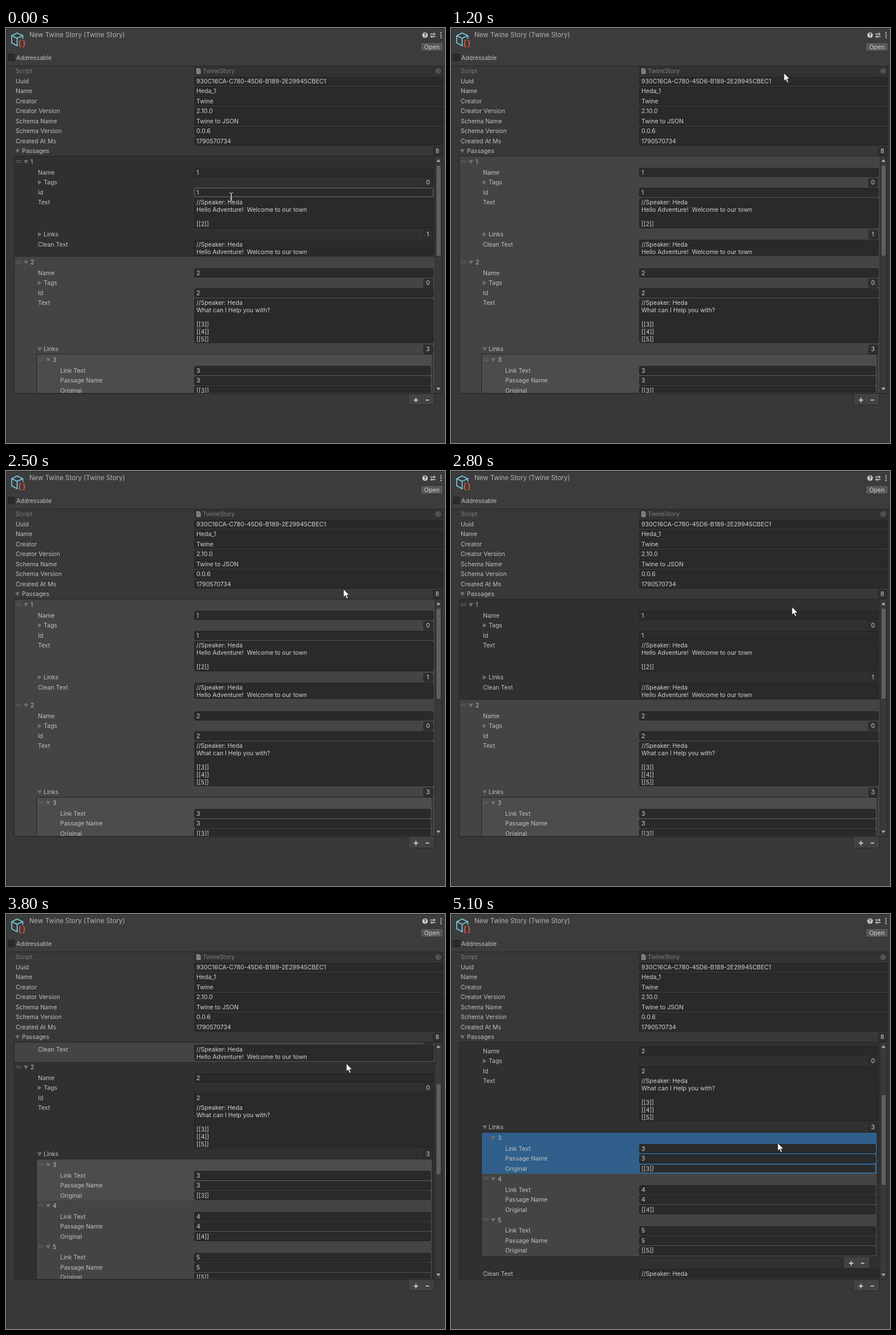
An HTML page that plays this animation: 770x727 px, repeating every 5200 ms.

```html
<!DOCTYPE html>
<html lang="en">
<head>
<meta charset="utf-8">
<title>Story inspector</title>
<style>
  html, body { margin: 0; width: 100%; height: 100%; overflow: hidden; background: #383838; }
  svg { display: block; }
  text { font: 10.52px Inter, "Liberation Sans", sans-serif; fill: #c0c0c0; white-space: pre; }
  .value { fill: #d0d0d0; }
  .dim { fill: #7d7d7d; }
  .title { font-size: 11.45px; fill: #b4b4b4; }
  .field { fill: #2a2a2a; stroke: #222; }
  .field.hover { stroke: #6c6c6c; }
  .field.focus { stroke: #3a78b4; }
  .count { fill: #2f2f2f; stroke: #252525; }
  .off { fill: #323232; stroke: #2a2a2a; }
  .mark { fill: #727272; }
  .grip { stroke: #666; fill: none; }
  .item { fill: #444; }
  .item.hover { fill: #303030; }
  .item.chosen { fill: #4c4c4c; }
  .item.active { fill: #2f5f8a; }
  .icon { fill: none; stroke: #c8c8c8; stroke-width: 1.3; }
  .sign { stroke: #dcdcdc; stroke-width: 1.6; }
</style>
</head>
<body>
<svg id="stage" width="770" height="727" viewBox="0 0 770 727">
  <defs><clipPath id="view"><rect x="15" y="225" width="737" height="414"/></clipPath></defs>
</svg>
<script>
const stage = document.getElementById('stage');
const LOOP = 5200, STEP = 100, LINE = 12.7;
const NPC = 'Heda';
const fields = [], items = [];

function add(parent, tag, attrs, content) {
  const el = document.createElementNS('http://www.w3.org/2000/svg', tag);
  for (const key in attrs) el.setAttribute(key, attrs[key]);
  if (content !== undefined) el.textContent = content;
  parent.appendChild(el);
  return el;
}

const path = (parent, d, cls, more) => add(parent, 'path', { d, class: cls, ...more });
const text = (parent, x, cy, str, cls = '', more) =>
  add(parent, 'text', { x, y: cy + 3.8, class: cls, ...more }, str);

function box(parent, x, y, right, bottom, attrs) {
  return add(parent, 'rect', {
    x: Math.round(x) + .5, y: Math.round(y) + .5,
    width: Math.round(right) - Math.round(x) - 1,
    height: Math.round(bottom) - Math.round(y) - 1, ...attrs
  });
}

function field(parent, cy, lines, right, bottom) {
  const top = cy - 8;
  bottom = bottom || cy + 8;
  const el = box(parent, 330, top, right, bottom, { class: 'field', rx: 2.5 });
  lines.forEach((line, i) => text(parent, 334, cy + i * LINE, line, 'value'));
  fields.push({ el, left: 330, right, top, bottom, scrolls: parent === list });
  return el;
}

function row(parent, x, cy, label, value, right) {
  text(parent, x, cy, label);
  return field(parent, cy, [value], right);
}

function fold(parent, x, cy, open) {
  const d = open ? `M${x - 4} ${cy - 3}h8l-4 6.5z` : `M${x - 3} ${cy - 4}v8l6.5 -4z`;
  path(parent, d, 'mark');
}

function count(parent, x, cy, n) {
  box(parent, x - 8, cy - 8, x + 9, cy + 8, { class: 'count', rx: 2.5 });
  text(parent, x, cy, n, 'value', { 'text-anchor': 'middle' });
}

function foldRow(cy, label, n, open) {
  fold(list, 59, cy, open);
  text(list, 66, cy, label);
  count(list, 740, cy, n);
}

function head(x, cy, name) {
  const y = Math.round(cy) - 2.5;
  const grip = path(list, `M${x - 5} ${y}h10m-10 3h10`, 'grip');
  fold(list, x + 13, cy, true);
  text(list, x + 21, cy, name);
  return grip;
}

function item(left, right, top, bottom) {
  const el = add(list, 'rect', { x: left, y: top, width: right - left, height: bottom - top, class: 'item' });
  const it = { el, left, right, top, bottom };
  items.push(it);
  return it;
}

function footer(parent, x, y) {
  path(parent, `M${x + .5} ${y + .5}h46v17q0 3 -3 3h-40q-3 0 -3 -3z`, '', { fill: '#424242', stroke: '#262626' });
  path(parent, `M${x + 10} ${y + 11.7}h8m-4 -4v8M${x + 31} ${y + 11.7}h6`, 'sign');
}

// Header
add(stage, 'rect', { width: 770, height: 727, fill: '#383838' });
add(stage, 'rect', { width: 770, height: 66, fill: '#3c3c3c' });
path(stage, 'M0 .5H770M.5 0V727M0 66.5H770', '', { stroke: '#262626' });
path(stage, 'M21 30.5L19.5 31L10 26V13.5L19.5 8.8L29.5 13.5V19M10 13.5L19.5 18L29.5 13.5M19.5 18V31', '',
  { fill: 'none', stroke: '#79cfe6', 'stroke-width': 1.6, 'stroke-linejoin': 'round' });
path(stage, 'M26.5 21.5q-2.3 0 -2.3 2v1.7q0 2 -1.8 2q1.8 0 1.8 2v1.7q0 2 2.3 2M29.5 21.5q2.3 0 2.3 2v1.7q0 2 1.8 2q-1.8 0 -1.8 2v1.7q0 2 -2.3 2', '',
  { fill: 'none', stroke: '#e2573a', 'stroke-width': 1.6 });
text(stage, 41, 12.5, 'New Twine Story (Twine Story)', 'title');
add(stage, 'circle', { cx: 735, cy: 12.5, r: 4.8, fill: '#d0d0d0' });
text(stage, 735, 12.2, '?', '', { 'text-anchor': 'middle', style: 'font-size:9px;font-weight:700;fill:#333' });
path(stage, 'M744 10.5h9.5M744 15h9.5M751 8v5M747 12.5v5', 'icon');
for (const y of [8.5, 12.5, 16.5]) add(stage, 'circle', { cx: 763, cy: y, r: 1.2, fill: '#c8c8c8' });
box(stage, 727, 25, 767, 41, { rx: 2.5, fill: '#585858', stroke: '#303030' });
text(stage, 747, 33, 'Open', 'value', { 'text-anchor': 'middle' });
box(stage, 3, 45, 16, 58, { class: 'field', rx: 2 });
text(stage, 18, 52, 'Addressable');

// Story properties
text(stage, 17, 75.5, 'Script', 'dim');
box(stage, 330, 68, 767, 83, { class: 'off', rx: 2.5 });
path(stage, 'M334 70.5h5l2.5 2.5v7.5h-7.5z', '', { fill: '#8c8c8c' });
path(stage, 'M336 74h3.5m-3.5 3h3.5', '', { stroke: '#444' });
text(stage, 345, 75.5, 'TwineStory', 'dim');
add(stage, 'circle', { cx: 758, cy: 75.5, r: 4, fill: 'none', stroke: '#868686' });
add(stage, 'circle', { cx: 758, cy: 75.5, r: 1.4, fill: '#868686' });

let list;
[['Uuid', '930C16CA-C780-45D6-B189-2E29945CBEC1'], ['Name', NPC + '_1'], ['Creator', 'Twine'],
 ['Creator Version', '2.10.0'], ['Schema Name', 'Twine to JSON'], ['Schema Version', '0.0.6'],
 ['Created At Ms', '1790570734']
].forEach(([label, value], i) => row(stage, 17, 93 + i * 17.5, label, value, 767));
fold(stage, 20, 215.5, true);
text(stage, 28, 215.5, 'Passages');
count(stage, 756.5, 215.5, 8);

// Passage list
box(stage, 14, 224, 765, 641, { fill: '#393939', stroke: '#242424' });
list = add(add(stage, 'g', { 'clip-path': 'url(#view)' }), 'g', {});

function passage(top, bottom, name, lines, links, linksY) {
  const y = top + 9.5;
  item(15, 752, top, bottom);
  head(22, y, name);
  row(list, 56, y + 18.3, 'Name', name, 750);
  foldRow(y + 36, 'Tags', 0, false);
  row(list, 56, y + 53.3, 'Id', name, 750);
  text(list, 56, y + 71, 'Text');
  field(list, y + 71, lines, 750, linksY - 10.5);
  foldRow(linksY, 'Links', links, links > 1);
}

function cleanText(cy, lines) {
  text(list, 56, cy, 'Clean Text');
  field(list, cy, lines, 750, cy + 20);
}

const hello = ['//Speaker: ' + NPC, 'Hello Adventure!  Welcome to our town'];
const help = ['//Speaker: ' + NPC, 'What can I Help you with?'];
passage(225, 401, '1', [...hello, '', '[[2]]'], 1, 361.5);
cleanText(379, hello);
passage(401, 860, '2', [...help, '', '[[3]]', '[[4]]', '[[5]]'], 3, 562.5);
box(list, 53, 571, 748, 790, { fill: '#444', stroke: '#242424' });

let chosen, chosenGrip, lastField;
['3', '4', '5'].forEach((name, i) => {
  const y = 581.6 + i * 71.7, top = Math.round(572.4 + i * 71.7);
  const it = item(54, 747, top, Math.round(572.4 + (i + 1) * 71.7) - (i === 2 ? 1 : 0));
  const grip = head(61, y, name);
  row(list, 95, y + 18.5, 'Link Text', name, 745);
  row(list, 95, y + 36, 'Passage Name', name, 745);
  const el = row(list, 95, y + 53.5, 'Original', `[[${name}]]`, 745);
  if (!i) [chosen, chosenGrip, lastField] = [it, grip, el];
});
footer(list, 688, 789);
cleanText(819, help);

// Scrollbar and list footer
path(stage, 'M752.5 225V640', '', { stroke: '#2c2c2c' });
path(stage, 'M755 234.5h7l-3.5 -4.5zM755 630h7l-3.5 4.5z', '', { fill: '#b0b0b0' });
const thumb = add(stage, 'rect', { x: 754.5, width: 8.5, height: 159, rx: 2, fill: '#5e5e5e', stroke: '#303030' });
footer(stage, 705, 640);

// Cursors
const arrow = path(stage, 'M0 0V14L3.2 11.1L5.6 16.6L7.9 15.6L5.6 10.3H10Z', '',
  { fill: '#fff', stroke: '#222', 'stroke-width': .8 });
const beam = add(stage, 'g', {});
const beamShape = 'M-3.5 -7.5Q0 -7.5 0 -5V5Q0 7.5 -3.5 7.5M3.5 -7.5Q0 -7.5 0 -5V5Q0 7.5 3.5 7.5M-2 3H2';
path(beam, beamShape, '', { fill: 'none', stroke: '#222', 'stroke-width': 2 });
path(beam, beamShape, '', { fill: 'none', stroke: '#dcdcdc' });

// Keys: time, then values
const moves = [
  [0, 395, 292], [100, 320, 262], [200, 150, 150], [300, 12, 22], [400, 14, 90], [500, 45, 170], [600, 150, 240],
  [700, 320, 250], [800, 450, 235], [900, 540, 200], [1000, 575, 150], [1100, 583, 105], [1200, 584, 79],
  [1400, 584, 79], [2000, 579, 132], [2500, 592, 207], [2600, 594, 193],
  [2700, 597, 222], [2800, 598, 238], [3200, 598, 258], [3700, 598, 258], [3800, 597, 262], [4400, 597, 262],
  [4500, 592, 320], [4600, 582, 430], [4700, 572, 535], [4800, 570, 574], [4900, 571, 490],
  [5000, 572, 414], [5100, 573, 401]
];
const scrolls = [[3100, 0], [3400, 47.25], [3500, 94.5], [3700, 94.5], [3800, 141.75], [4000, 141.75], [4200, 189]];

function at(keys, t) {
  const n = keys.findIndex(k => k[0] >= t);
  if (n === 0) return keys[0].slice(1);
  if (n < 0) return keys[keys.length - 1].slice(1);
  const a = keys[n - 1], b = keys[n], u = (t - a[0]) / (b[0] - a[0]);
  return a.slice(1).map((v, i) => v + (b[i + 1] - v) * u);
}

const inside = (r, x, y) => x >= r.left && x < r.right && y >= r.top && y < r.bottom;

function draw(time) {
  const t = Math.floor(time % LOOP / STEP) * STEP;
  const [x, y] = at(moves, t);
  const scroll = Math.round(at(scrolls, t)[0]);
  const inList = x >= 15 && x < 752 && y >= 225 && y < 639;
  list.setAttribute('transform', `translate(0 ${-scroll})`);
  thumb.setAttribute('y', 240.5 + Math.round(scroll * .4));

  for (const it of items) it.el.classList.toggle('hover', inList && inside(it, x, y + scroll));
  let typing = false;
  for (const f of fields) {
    const over = f.scrolls ? inList && inside(f, x, y + scroll) : inside(f, x, y);
    f.el.classList.toggle('hover', over);
    typing = typing || over;
  }

  const active = t >= 5000;
  chosen.el.classList.toggle('chosen', !active);
  chosen.el.classList.toggle('active', active);
  lastField.classList.toggle('focus', active);
  chosenGrip.style.display = active ? 'none' : '';

  arrow.style.display = typing ? 'none' : '';
  beam.style.display = typing ? '' : 'none';
  arrow.setAttribute('transform', `translate(${x} ${y})`);
  beam.setAttribute('transform', `translate(${x} ${y + 4})`);
}

const start = performance.now();
function tick() {
  draw(performance.now() - start);
  requestAnimationFrame(tick);
}
tick();
</script>
</body>
</html>
```
